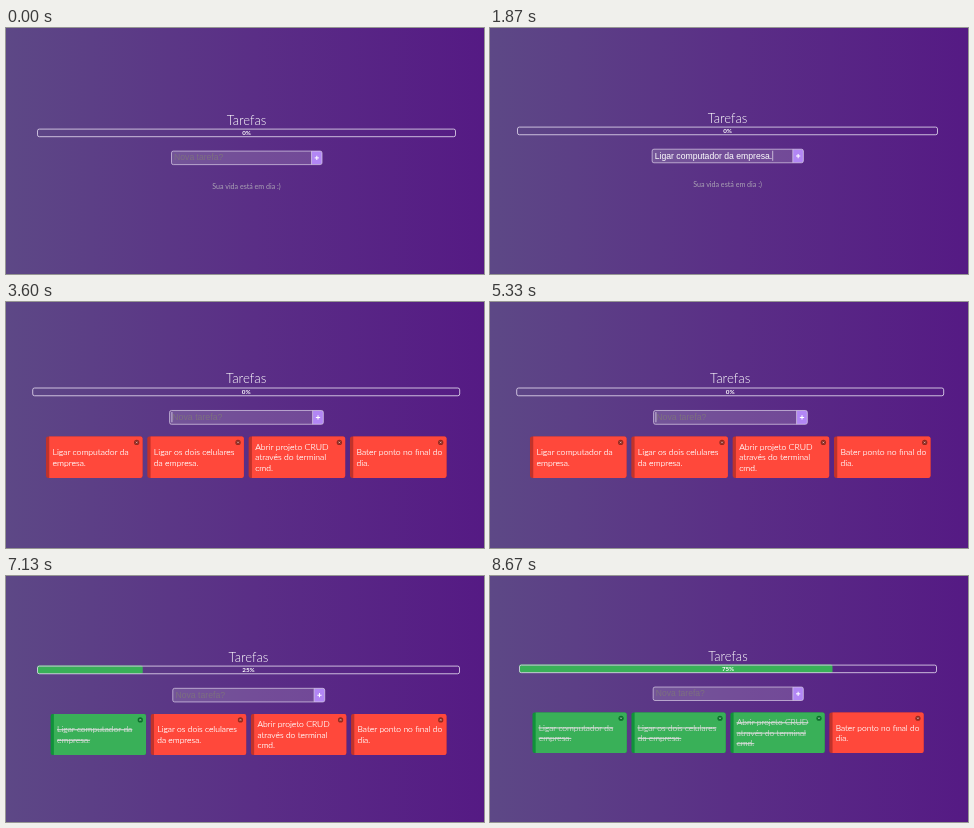
An HTML page that plays this animation: 478 px wide and 246 px high, repeating every 8990 ms.

```html
<!DOCTYPE html>
<html lang="pt-BR">
<head>
<meta charset="utf-8">
<title>Tarefas</title>
<style>
  html, body { margin: 0; width: 100%; height: 100%; overflow: hidden; }
  body { background: linear-gradient(to right, #5d4886, #5a2e86 52%, #551a84); }
  svg { display: block; width: 478px; height: 246px; }
  text { font-family: Lato, sans-serif; fill: #fff; }
  .title { font-size: 13px; font-weight: 300; text-anchor: middle; }
  .percent { font-size: 6.2px; font-weight: 700; text-anchor: middle; }
  .empty { font-size: 7.1px; fill: #aaa2b4; text-anchor: middle; }
  .field { font: 8.6px "Liberation Sans", Arial, sans-serif; }
  .hint { fill: #7c6f7f; }
  .task { font-size: 8.45px; font-weight: 300; stroke: #fff; stroke-width: .15; }
  .done { fill: #ddd; stroke: #ddd; text-decoration: line-through; }
  .line { fill: none; stroke: #d8cce6; stroke-width: .9; }
</style>
</head>
<body>
<svg id="stage" viewBox="0 0 478 246"></svg>
<script>
const LOOP = 8990, HOLD = 1800, BAR = 419;
const TASKS = [
  ["Ligar computador da", "empresa."],
  ["Ligar os dois celulares", "da empresa."],
  ["Abrir projeto CRUD", "através do terminal", "cmd."],
  ["Bater ponto no final do", "dia."]
];
// x, y: centre and top of the progress bar; w: its width
const SCREENS = [
  { x: 240.5, y: 100.6, w: 419 },
  { x: 237.5, y: 98.6, w: 421, typed: "Ligar computador da empresa." },
  { x: 240.2, y: 85.5, w: 428, tasks: true, done: 0, focus: true },
  { x: 242.5, y: 89.6, w: 423, tasks: true, done: 1 },
  { x: 238, y: 88.6, w: 418, tasks: true, done: 3 }
];

const rect = (x, y, w, h, r, attrs) =>
  `<rect x="${x}" y="${y}" width="${w}" height="${h}" rx="${r}" ${attrs}/>`;
const text = (cls, x, y, str) => `<text class="${cls}" x="${x}" y="${y}">${str}</text>`;
const fill = color => `fill="${color}"`;

function progress(done) {
  const left = -BAR / 2, pct = done * 25;
  const part = pct ? rect(left, 0, BAR * pct / 100, 8.4, 1.8, fill("#39b058")) : "";
  return part + rect(left + .5, .5, BAR - 1, 7.6, 1.8, 'class="line"')
    + text("percent", 0, 6.6, pct + "%");
}

function field({ typed, focus }) {
  const caretX = typed ? 44.8 : -73;
  const caret = typed || focus ? rect(caretX, 24, .6, 10, 0, fill("#fff")) : "";
  return rect(-75, 22.5, 140, 13.5, 1.5, fill("rgba(255,255,255,.15)"))
    + `<path d="M65 22.5h8.5a2 2 0 0 1 2 2v9.5a2 2 0 0 1 -2 2H65z" fill="#b286f5"/>`
    + rect(-75, 22.5, 150.5, 13.5, 1.8, 'class="line" stroke-opacity=".8"')
    + `<path d="M65 22.5v13.5" class="line" stroke-opacity=".8"/>`
    + `<path d="M68.2 29.3h4.2m-2.1 -2.1v4.2" stroke="#fff"/>`
    + text(typed ? "field" : "field hint", -72.4, 31.9, typed || "Nova tarefa?") + caret;
}

function card(lines, i, done) {
  const [main, edge] = done ? ["#39b058", "#10913a"] : ["#ff483b", "#c0332b"];
  const rows = lines.map((str, n) =>
    text(done ? "task done" : "task", 6.4, 23.4 + (n - (lines.length - 1) / 2) * 10.5, str));
  return `<g transform="translate(${-196 + i * 99.2} 48)">`
    + rect(0, 0, 94.5, 40.5, 2, fill(edge))
    + `<path d="M3.2 0H92.5a2 2 0 0 1 2 2V38.5a2 2 0 0 1 -2 2H3.2z" fill="${main}"/>`
    + `<circle cx="88.8" cy="5.8" r="2.6" fill="${done ? "#0b6f2b" : "#92291f"}"/>`
    + `<path d="M88 5l1.6 1.6m0 -1.6l-1.6 1.6" stroke="#eee" stroke-width=".5"/>`
    + rows.join("") + `</g>`;
}

function screen(s) {
  const body = s.tasks
    ? TASKS.map((lines, i) => card(lines, i, i < s.done)).join("")
    : text("empty", 0, 60.2, "Sua vida está em dia :)");
  return `<g transform="translate(${s.x} ${s.y}) scale(${s.w / BAR})">`
    + text("title", 0, -4, "Tarefas") + progress(s.done || 0) + field(s) + body + `</g>`;
}

const stage = document.getElementById("stage");
stage.innerHTML = SCREENS.map(screen).join("");
const groups = [...stage.children];

function draw() {
  const now = Math.floor(performance.now() % LOOP / HOLD);
  groups.forEach((g, i) => { g.style.display = i === now ? "" : "none"; });
  requestAnimationFrame(draw);
}
draw();
</script>
</body>
</html>
```
